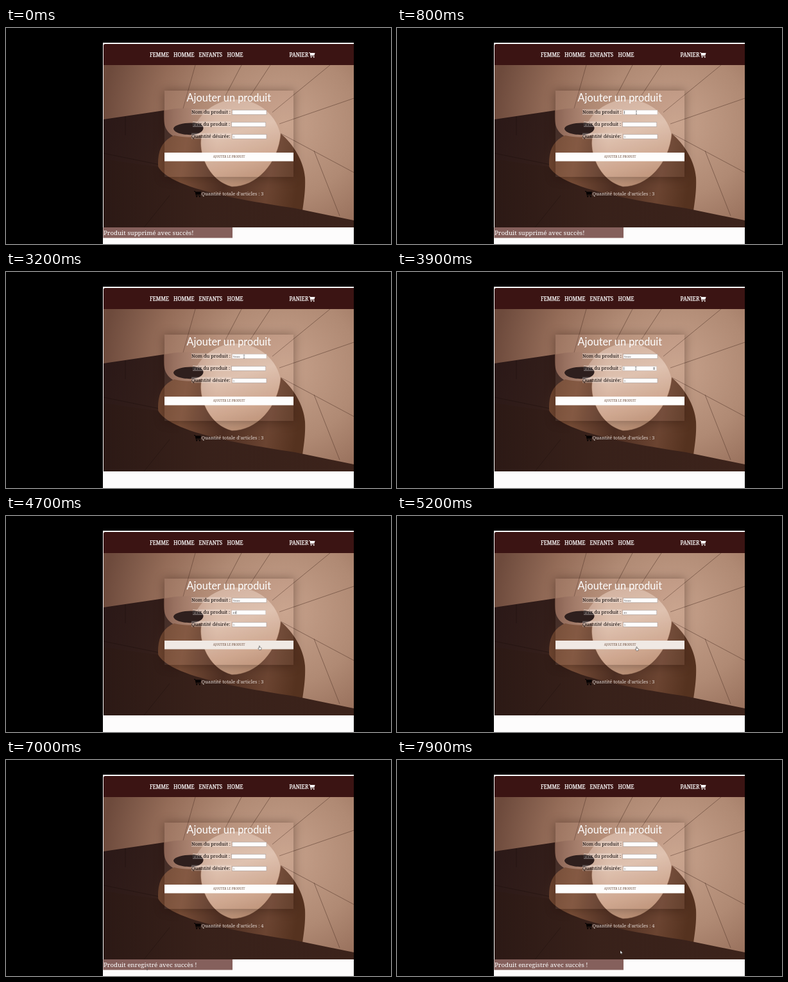
Write an HTML page that moves like this. It is 600x338 px and loops after 8 s.

```html
<!DOCTYPE html>
<html lang="fr">
<head>
<meta charset="utf-8">
<title>Ajouter un produit</title>
<style>
  html, body { margin: 0; width: 100%; height: 100%; overflow: hidden; background: #000; }
  #stage { position: relative; width: 600px; height: 338px; overflow: hidden; }
  svg { position: absolute; left: 0; top: 0; }
  #card {
    position: absolute; left: 247px; top: 98px; width: 201px; height: 135px;
    background: rgba(255, 215, 190, .07); box-shadow: 0 1px 14px 1px rgba(30, 12, 6, .36);
  }
  text { font-family: "Noto Serif", Georgia, serif; font-size: 7.44px; fill: #0c0504; white-space: pre; }
  .nav text { font-size: 8.1px; fill: #fff; stroke: #fff; stroke-width: .25px; }
  .title { font-family: Lato, "Open Sans", sans-serif; font-size: 16.3px; fill: #fff; }
  .field { fill: #fff; stroke: #a89a96; stroke-width: .6px; }
  .value { font-size: 4.3px; fill: #4a4140; }
  .plate { fill: #fff; opacity: .26; }
  .light { fill: #e6dcd6; }
  #notice text { font-size: 9.7px; fill: #fff; }
</style>
</head>
<body>
<div id="stage">
  <svg width="600" height="338">
    <defs>
      <clipPath id="frame"><rect x="152" y="58" width="390" height="254"/></clipPath>
      <radialGradient id="wood" gradientUnits="userSpaceOnUse" cx="435" cy="150" r="285">
        <stop offset="0" stop-color="#c6a18b"/>
        <stop offset=".4" stop-color="#b08a74"/>
        <stop offset=".7" stop-color="#946c58"/>
        <stop offset="1" stop-color="#6d4a3c"/>
      </radialGradient>
      <linearGradient id="slab" x1="0" y1="0" x2="1" y2=".4">
        <stop offset="0" stop-color="#2a1817"/>
        <stop offset=".6" stop-color="#331e1a"/>
        <stop offset="1" stop-color="#4a2f25"/>
      </linearGradient>
      <linearGradient id="floor" x1="0" y1="0" x2="1" y2="0">
        <stop offset="0" stop-color="#2c1915"/>
        <stop offset=".4" stop-color="#38211a"/>
        <stop offset="1" stop-color="#3c231b"/>
      </linearGradient>
      <linearGradient id="glow" x1=".3" y1="0" x2=".6" y2="1">
        <stop offset="0" stop-color="#cfb09d"/>
        <stop offset=".4" stop-color="#dcc0ae"/>
        <stop offset=".75" stop-color="#cba48c"/>
        <stop offset="1" stop-color="#b78c71"/>
      </linearGradient>
      <linearGradient id="inner" x1="0" y1="0" x2="1" y2="0">
        <stop offset="0" stop-color="#80594a"/>
        <stop offset="1" stop-color="#c09a85" stop-opacity="0"/>
      </linearGradient>
      <linearGradient id="ring" x1="0" y1="0" x2="1" y2=".1">
        <stop offset="0" stop-color="#6b432e"/>
        <stop offset=".2" stop-color="#7b5039"/>
        <stop offset=".5" stop-color="#4c2d21"/>
        <stop offset=".8" stop-color="#6b4431"/>
        <stop offset="1" stop-color="#55321f"/>
      </linearGradient>
    </defs>
    <rect x="151" y="23" width="391" height="315" fill="#fdfcfc"/>
    <path d="M152 58V27.500Q152 25 154.500 25H542V58Z" fill="#3b1413"/>
    <g clip-path="url(#frame)">
      <rect x="152" y="58" width="390" height="254" fill="url(#wood)"/>
      <path d="M295 58L276 126M367 58L342 106M412 58L378 110M505 58L415 132M542 110L426 150M542 226L428 165M480 192L520 294"
        fill="none" stroke="#573a2c" stroke-width="1" opacity=".55"/>
      <ellipse cx="359" cy="180" rx="70" ry="68" fill="url(#glow)"/>
      <path d="M246 129C275 124 300 124 330 130V200H246Z" fill="url(#inner)"/>
      <path d="M152 143L246 129C246 145 244 160 262 170L290 312H152Z" fill="url(#slab)"/>
      <path d="M186 138V168M152 196L240 214" stroke="#1d0f0d" stroke-width="1" opacity=".5"/>
      <path d="M261 157C264 149 292 146 304 151C312 156 306 166 291 167C277 168 261 164 261 157Z" fill="#1e1110"/>
      <path d="M428 165C448 182 464 208 466 234C467 255 464 272 460 300H300C262 278 237 245 237 212C237 190 244 176 262 168C280 172 296 172 306 166C298 188 312 238 352 248C390 248 424 212 428 165Z" fill="url(#ring)"/>
      <path d="M306 166C298 188 312 238 352 248C390 248 424 212 428 165" fill="none" stroke="#c49b80" stroke-width="1" opacity=".5"/>
      <path d="M152 205C185 210 212 214 237 217C254 246 330 264 450 282L542 301V312H152Z" fill="url(#floor)"/>
      <path d="M215 312L255 262" stroke="#1d0f0d" stroke-width="1" opacity=".4"/>
    </g>
  </svg>
  <div id="card"></div>
  <svg width="600" height="338">
    <defs>
      <path id="cart" d="M0 .4H1.700L2.200 1.500H9.600L8.400 5.400H3.100L3.300 6.200H8.600V7H2.600L1.300 1.200H0ZM2.700 8.100a.9.9 0 1 0 1.800 0a.9.9 0 1 0-1.800 0M6.900 8.100a.9.9 0 1 0 1.800 0a.9.9 0 1 0-1.800 0"/>
    </defs>
    <g class="nav">
      <text x="224" y="45.400">FEMME</text>
      <text x="261" y="45.400">HOMME</text>
      <text x="300.500" y="45.400">ENFANTS</text>
      <text x="344.500" y="45.400">HOME</text>
      <text x="441.500" y="45.400">PANIER</text>
      <use href="#cart" x="472" y="37.500" fill="#fff"/>
    </g>
    <text class="title" x="347.300" y="115.300" text-anchor="middle">Ajouter un produit</text>

    <rect class="plate" x="289" y="127" width="62" height="9"/>
    <rect class="plate" x="291" y="146" width="59" height="9"/>
    <rect class="plate" x="289" y="164.500" width="62" height="9"/>
    <text x="289" y="133.900">Nom du produit :</text>
    <text x="290.700" y="152.700">Prix du produit :</text>
    <text x="289" y="171.500">Quantité désirée:</text>

    <rect class="field" id="nameBox" x="352.400" y="128.400" width="53.600" height="7"/>
    <rect class="field" id="priceBox" x="351.400" y="147.400" width="53.400" height="7"/>
    <rect class="field" x="352.400" y="166.400" width="53.600" height="7"/>
    <text class="value" id="name" x="354" y="133.700"></text>
    <text class="value" id="price" x="353.300" y="152.700"></text>
    <text class="value" x="354" y="171.500" style="font-size:3.600px">1</text>
    <path id="spin" d="M399.300 150.400L400.600 148.800L401.900 150.400ZM399.300 151.600L400.600 153.200L401.900 151.600Z" fill="#444"/>
    <rect id="caret" width=".6" height="4.800" fill="#222"/>

    <rect id="button" x="247" y="195" width="201" height="13.500"/>
    <text x="347.500" y="203.300" text-anchor="middle" style="font-size:4.700px;fill:#6b4a38">AJOUTER LE PRODUIT</text>

    <use href="#cart" transform="translate(293 254.500) scale(1.150)" fill="#050202"/>
    <text class="light" id="total" x="304.500" y="262"></text>

    <g id="notice">
      <rect x="151.500" y="312" width="201.500" height="16.500" fill="#85605c"/>
      <text x="152" y="324.200"></text>
    </g>

    <g id="cursor">
      <path id="arrow" d="M0 0V5.200L1.200 4.200L2 6L2.900 5.600L2.100 3.900H3.700Z" fill="#fff" stroke="#222" stroke-width=".45"/>
      <path id="beam" d="M-1-2.600H1M0-2.600V2.600M-1 2.600H1" fill="none" stroke="#555" stroke-width=".6"/>
      <path id="hand" d="M-.6.500Q0-.3.600.500V2.500L2.600 3Q3.200 3.300 3 4.200L2.500 6.300H-.7L-2.200 3.900Q-1.800 3.100-.6 4Z" fill="#fff" stroke="#222" stroke-width=".5"/>
    </g>
  </svg>
</div>
<script>
const $ = id => document.getElementById(id);
const LOOP = 8000, TICK = 100;

// time, x, y, shape from that time on
const path = [
  [100, 537, 306, "arrow"], [200, 490, 240, "arrow"], [300, 430, 175, "arrow"],
  [400, 390, 140, "beam"], [500, 373, 132.5, "beam"], [3100, 373, 132.5, "beam"],
  [3200, 371, 132.5, "beam"], [3300, 403, 160, "arrow"], [3400, 422, 186, "arrow"],
  [3500, 372, 225, "arrow"], [3600, 303, 186, "arrow"], [3700, 345, 163, "arrow"],
  [3800, 372, 151, "beam"], [4200, 373, 151, "beam"], [4300, 430, 190, "arrow"],
  [4400, 500, 252, "arrow"], [4500, 535, 298, "arrow"], [4600, 460, 245, "arrow"],
  [4700, 395, 203, "hand"], [4800, 373.5, 204.5, "hand"], [6200, 373.5, 204.5, "hand"],
  [6300, 364, 211.5, "hand"], [6400, 356, 224, "arrow"], [6700, 300, 278, "arrow"],
  [7000, 220, 326, "beam"], [7100, 229, 333, "arrow"], [7200, 245, 325, "beam"],
  [7400, 282, 319, "beam"], [7500, 271, 318, "beam"], [7600, 271, 318, "beam"],
  [7700, 290, 314, "beam"], [7800, 322, 306, "arrow"], [7900, 348, 298, "arrow"]
];
const nameKeys = [1900, 2200, 2400, 2500, 2700];
const priceKeys = [4200, 4400];

const show = (el, on) => { el.style.display = on ? "" : "none"; };
const within = (t, a, b) => t >= a && t < b;
const typed = (word, keys, t) => word.slice(0, keys.filter(k => k <= t).length);

function moveCursor(t) {
  show($("cursor"), t >= path[0][0]);
  if (t < path[0][0]) return;
  let i = path.length - 1;
  while (path[i][0] > t) i--;
  const a = path[i], b = path[i + 1] || a;
  const k = b === a ? 0 : (t - a[0]) / (b[0] - a[0]);
  const x = a[1] + (b[1] - a[1]) * k, y = a[2] + (b[2] - a[2]) * k;
  $("cursor").setAttribute("transform", `translate(${x} ${y})`);
  for (const kind of ["arrow", "beam", "hand"]) show($(kind), kind === a[3]);
}

function draw(t) {
  const sent = t >= 5300;
  const inName = within(t, 800, 3800), inPrice = within(t, 3800, 5100);
  const name = $("name"), price = $("price"), caret = $("caret");

  name.textContent = sent ? "" : typed("Veste", nameKeys, t);
  price.textContent = sent ? "" : typed("45", priceKeys, t);
  $("nameBox").style.stroke = inName ? "#c4b7b1" : "";
  $("priceBox").style.stroke = inPrice ? "#c4b7b1" : "";
  show($("spin"), within(t, 3800, 4300));

  show(caret, within(t, 800, 1400) || within(t, 1900, 3200) || within(t, 3800, 4900));
  const at = inPrice ? price : name;
  caret.setAttribute("x", +at.getAttribute("x") + at.getComputedTextLength() + .2);
  caret.setAttribute("y", inPrice ? 148.6 : 129.7);

  $("button").setAttribute("fill", within(t, 4700, 6300) ? "#f0e9e4" : "#fefdfc");
  $("total").textContent = "Quantité totale d'articles : " + (sent ? 4 : 3);
  show($("notice"), t < 900 || sent);
  $("notice").lastElementChild.textContent =
    sent ? "Produit enregistré avec succès !" : "Produit supprimé avec succès!";
  moveCursor(t);
}

const start = performance.now();
function tick() {
  const t = (performance.now() - start) % LOOP;
  draw(Math.floor(t / TICK) * TICK);
  requestAnimationFrame(tick);
}
tick();
</script>
</body>
</html>
```
